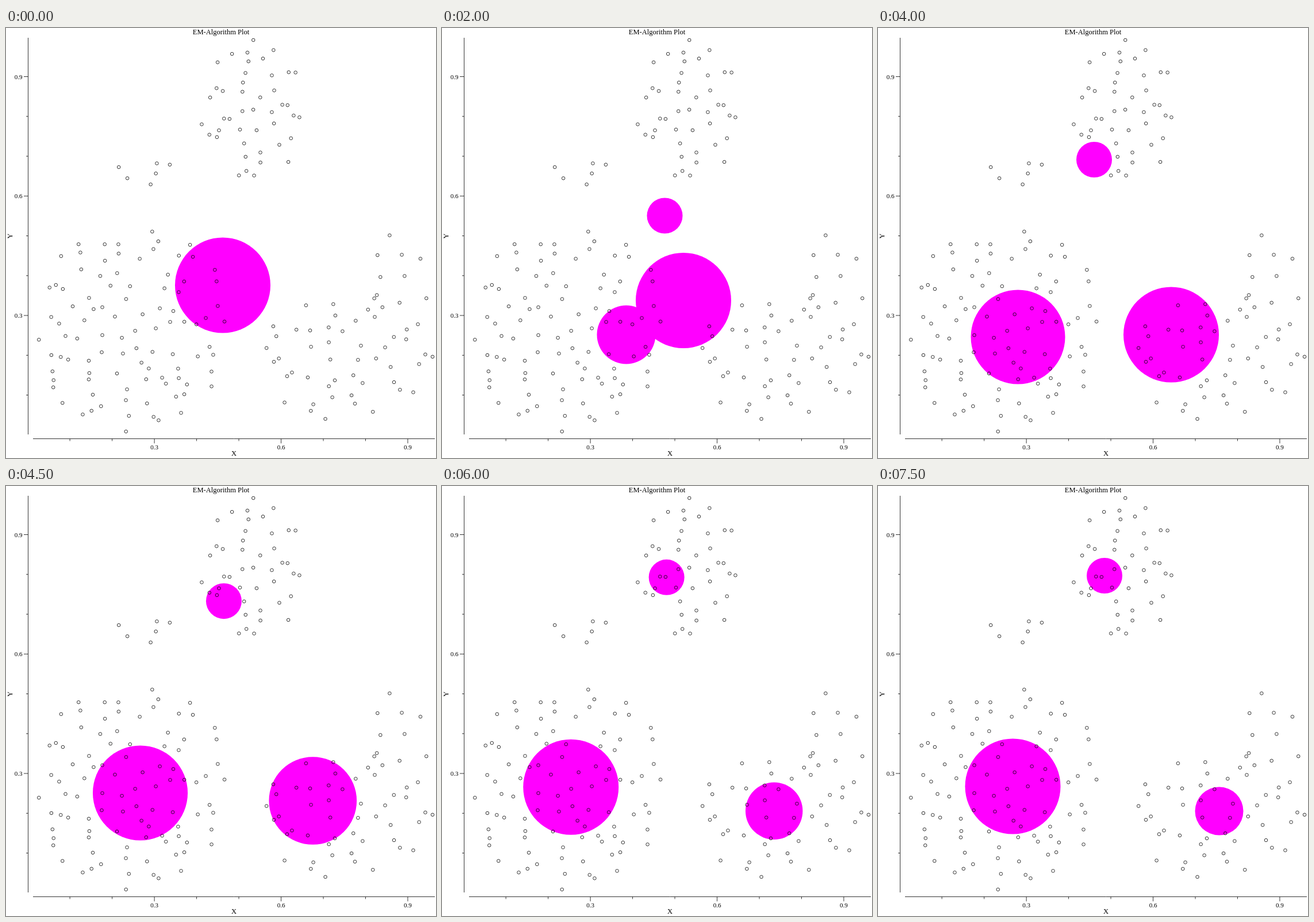
An HTML page with a canvas for the animation above (8000 ms loop, 748 px wide and 748 px high).

```html
<!DOCTYPE html>
<html>
<head>
<meta charset="utf-8">
<style>
html, body { margin: 0; width: 100%; height: 100%; overflow: hidden; background: #fff; }
canvas { display: block; width: 748px; height: 748px; }
</style>
</head>
<body>
<canvas width="748" height="748"></canvas>
<script>
const ctx = document.querySelector('canvas').getContext('2d');
const LOOP = 8000, STEP = 500, FONT = '"Liberation Serif", "Times New Roman", serif';

let seed = 17;
const rand = () => (seed = seed * 16807 % 2147483647) / 2147483647;

// Evenly filled ellipse of dots: spiral placement with some jitter
function cluster(x, y, rx, ry, count) {
  return Array.from({ length: count }, (_, i) => {
    const d = Math.sqrt((i + rand()) / count), a = i * 2.4 + rand() * 0.8;
    return [x + rx * d * Math.cos(a), y + ry * d * Math.sin(a)];
  });
}

const dots = [
  ...cluster(430, 142, 92, 125, 44),
  ...cluster(238, 252, 56, 30, 6),
  ...cluster(220, 522, 174, 184, 96),
  ...cluster(594, 573, 152, 116, 50),
  ...cluster(680, 430, 62, 76, 9)
];

// Key states of each disc, [x, y, radius], at the iterations in keyTimes
const keyTimes = [2, 4, 6, 8, 11, 15];
const discs = [
  [[342, 521, 43], [320.5, 533.5, 51], [287.5, 538.5, 63], [243.5, 537.5, 82], [223, 524.5, 83], [234.5, 522.5, 83]],
  [[401, 461, 83], [420, 474, 83], [456, 497.5, 83], [510, 533.5, 83], [570, 565, 53.5], [593.5, 565.5, 42]],
  [[390, 353, 31], [387.5, 326.5, 31], [383.5, 289, 31], [376, 229, 31], [389, 160.5, 31], [394, 156, 31]]
];

// Smooth curve through the keys that never overshoots them
function curve(v, t) {
  const k = keyTimes, last = k.length - 2;
  const slope = i => (v[i + 1] - v[i]) / (k[i + 1] - k[i]);
  const tangent = i => {
    const a = slope(Math.max(i - 1, 0)), b = slope(Math.min(i, last));
    return a * b > 0 ? 2 * a * b / (a + b) : 0;
  };
  let i = 0;
  while (i < last && t >= k[i + 1]) i++;
  const h = k[i + 1] - k[i], s = (t - k[i]) / h, q = 1 - s, m = slope(i);
  return v[i] + h * (s * m + s * q * (q * (tangent(i) - m) - s * (tangent(i + 1) - m)));
}

function discsAt(step) {
  if (step < 2) return [[377 + step, 447.5 + 1.5 * step, 83]];
  return discs.map(keys => [0, 1, 2].map(j => curve(keys.map(key => key[j]), step)));
}

function circle(x, y, r) {
  ctx.beginPath();
  ctx.arc(x, y, r, 0, 2 * Math.PI);
}

function line(x1, y1, x2, y2) {
  ctx.beginPath();
  ctx.moveTo(x1, y1);
  ctx.lineTo(x2, y2);
  ctx.stroke();
}

function text(s, x, y, size = 12.5, align = 'center') {
  ctx.font = `${size}px ${FONT}`;
  ctx.textAlign = align;
  ctx.fillText(s, x, y);
}

function axes() {
  line(47, 714.5, 746, 714.5);
  line(38.5, 17, 38.5, 707);
  for (let i = 1; i < 10; i++) {
    const x = 37.7 + 73.47 * i, y = 707.8 - 69.25 * i, major = i % 3 === 0;
    line(x, 714.5, x, major ? 722.5 : 718.5);
    line(major ? 31 : 35, y, 38.5, y);
    if (major) {
      text('0.' + i, x, 733, 11);
      text('0.' + i, 28.5, y + 4, 11, 'right');
    }
  }
  text('EM-Algorithm Plot', 374, 11);
  text('X', 396.5, 744);
  ctx.save();
  ctx.translate(10.5, 362);
  ctx.rotate(-Math.PI / 2);
  text('Y', 0, 0);
  ctx.restore();
}

function draw(now) {
  const step = Math.floor(now % LOOP / STEP);
  ctx.fillStyle = '#fff';
  ctx.fillRect(0, 0, 748, 748);
  ctx.fillStyle = '#f0f';
  for (const disc of discsAt(step)) {
    circle(...disc);
    ctx.fill();
  }
  ctx.fillStyle = ctx.strokeStyle = '#000';
  ctx.lineWidth = 0.8;
  axes();
  for (const [x, y] of dots) {
    circle(x, y, 2.75);
    ctx.stroke();
  }
  requestAnimationFrame(draw);
}
requestAnimationFrame(draw);
</script>
</body>
</html>
```
